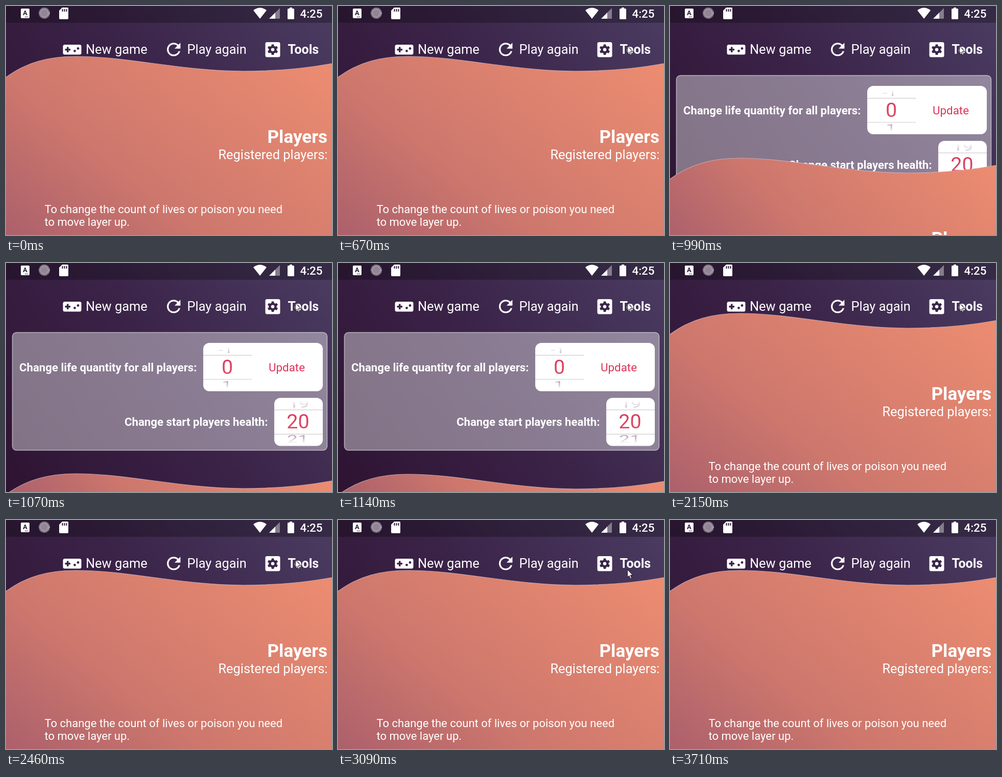
These frames come from a looping animation (638 by 450 pixels, 4020 ms). An HTML page:

```html
<!DOCTYPE html>
<html lang="en">
<head>
<meta charset="utf-8">
<title>Life counter tools</title>
<style>
  html, body { margin: 0; width: 100%; height: 100%; overflow: hidden; background: #33183a; }
  svg { display: block; width: 638px; height: 450px; font-family: Roboto, sans-serif; fill: #fff; }
  .bold { font-weight: 700; }
  .end { text-anchor: end; }
  .mid { text-anchor: middle; }
  .menu { font-size: 25.4px; }
  .label { font-size: 22.2px; }
  .dark { fill: #39254b; }
  .line { stroke: #cfcbd0; stroke-width: 1.2; }
  .value { font-size: 39.5px; fill: url(#red); }
  .faded { font-size: 38px; }
</style>
</head>
<body>
<svg viewBox="0 0 638 450">
  <defs>
    <linearGradient id="night" gradientUnits="userSpaceOnUse" x1="0" y1="450" x2="638" y2="0">
      <stop stop-color="#2e1332"/><stop offset=".5" stop-color="#3b2348"/><stop offset="1" stop-color="#4b3c62"/>
    </linearGradient>
    <linearGradient id="coral" gradientUnits="userSpaceOnUse" x1="638" y1="99" x2="0" y2="899">
      <stop stop-color="#ed8d71"/><stop offset=".42" stop-color="#cd776d"/>
      <stop offset=".7" stop-color="#a65c6b"/><stop offset="1" stop-color="#784169"/>
    </linearGradient>
    <linearGradient id="red" x2="0" y2="1">
      <stop stop-color="#d8345c"/><stop offset="1" stop-color="#e0566a"/>
    </linearGradient>
    <linearGradient id="fadeUp" x2="0" y2="1">
      <stop offset=".2" stop-color="#fff"/><stop offset="1" stop-color="#b9aab2"/>
    </linearGradient>
    <linearGradient id="fadeDown" x2="0" y2="1">
      <stop offset=".2" stop-color="#b9a2ac"/><stop offset=".9" stop-color="#fff"/>
    </linearGradient>
    <clipPath id="wheelA"><rect x="386" y="157" width="95" height="95"/></clipPath>
    <clipPath id="wheelB"><rect x="525" y="265" width="95" height="94"/></clipPath>
  </defs>

  <rect width="638" height="450" fill="url(#night)"/>
  <rect width="638" height="33" fill="#000" opacity=".28"/>

  <g id="status">
    <rect x="29" y="5" width="17" height="19" rx="2"/>
    <text class="mid bold" x="37.5" y="18" font-size="13" fill="#2c1a35">A</text>
    <path d="M37 21.5h6" stroke="#2c1a35" stroke-width="1.3" stroke-dasharray="1.3 1"/>
    <circle cx="75" cy="14" r="8.5" fill="#918596"/>
    <circle cx="75" cy="14" r="9" fill="none" stroke="#bfb7c3" stroke-width="4" stroke-dasharray="1.4 1"/>
    <path d="M110 3h10q2 0 2 2v19q0 2-2 2h-14q-2 0-2-2V9z"/>
    <path d="M110.500 6v5M114.500 6v5M118.500 6v5" stroke="#2c1a35" stroke-width="2"/>
    <path d="M484 8.500Q497-1.500 510 8.500L497 25z"/>
    <path d="M536 4v21h-21z" opacity=".4"/>
    <path d="M527 13v12h-12z"/>
    <path d="M555 3h5v2h2.500q1.500 0 1.500 1.500v18q0 1.500-1.500 1.500h-10q-1.500 0-1.500-1.500v-18q0-1.500 1.500-1.500h2.500z"/>
    <text x="575.500" y="23" font-size="22.300" font-weight="500">4:25</text>
  </g>

  <g id="menu">
    <rect x="111.500" y="76" width="36" height="19.500" rx="3.500"/>
    <path class="dark" d="M119 80.500h3.500v3.500h3.500v3.500h-3.500v3.500h-3.500v-3.500h-3.500v-3.500h3.500z"/>
    <circle class="dark" cx="134.500" cy="88.300" r="2.400"/>
    <circle class="dark" cx="141" cy="83.500" r="2.400"/>
    <text class="menu" x="156" y="94">New game</text>
    <path transform="translate(308.400 65.600) scale(1.65)" d="M17.650 6.350C16.200 4.900 14.210 4 12 4c-4.420 0-7.990 3.580-7.990 8s3.570 8 7.990 8c3.730 0 6.840-2.550 7.730-6h-2.080c-.82 2.330-3.040 4-5.650 4-3.310 0-6-2.690-6-6s2.690-6 6-6c1.660 0 3.140.69 4.220 1.780L13 11h7V4z"/>
    <text class="menu" x="354.500" y="94">Play again</text>
    <rect x="507.500" y="71" width="29" height="29.500" rx="3.500"/>
    <g id="gear" transform="translate(522 85.700)">
      <circle r="5.500" fill="none" stroke="#39254b" stroke-width="4.500"/>
    </g>
    <text class="bold" x="551.500" y="94" font-size="25">Tools</text>
  </g>

  <g id="panel">
    <rect x="12.500" y="136.500" width="616" height="231.500" rx="8" fill-opacity=".4" stroke="#fff" stroke-opacity=".55" stroke-width="1.500"/>
    <text class="label bold end" x="373.500" y="213">Change life quantity for all players:</text>
    <rect x="386" y="157" width="234" height="95" rx="12"/>
    <path class="line" d="M386 181.300h95M386 228.500h95"/>
    <text class="value mid" x="433" y="218">0</text>
    <g clip-path="url(#wheelA)" class="faded mid">
      <text transform="translate(430 177) scale(.9 .48)" fill="url(#fadeUp)">-1</text>
      <text transform="translate(432 245) scale(.9 .48)" fill="url(#fadeDown)">1</text>
    </g>
    <text class="mid" x="549.500" y="213" font-size="22.400" fill="#dc3558">Update</text>
    <text class="label bold end" x="512.500" y="320">Change start players health:</text>
    <rect x="525" y="265" width="95" height="94.500" rx="12"/>
    <path class="line" d="M525 288.700h95M525 336.300h95"/>
    <text class="value mid" x="571.500" y="325">20</text>
    <g clip-path="url(#wheelB)" class="faded mid">
      <text transform="translate(573 284) scale(.95 .52)" fill="url(#fadeUp)">19</text>
      <text transform="translate(571 353) scale(.98 .52)" fill="url(#fadeDown)">21</text>
    </g>
  </g>

  <g id="layer">
    <path d="M-4 143L0 140C40 110 85 99 137 99C237 99 345 128 465 128C530 128 590 122 638 113L642 112V900H-4z" fill="url(#coral)" stroke="#d3b9c3" stroke-opacity=".75" stroke-width="1.200"/>
    <text class="bold end" x="629" y="269" font-size="35">Players</text>
    <text class="menu end" x="629.500" y="301">Registered players:</text>
    <text x="75.500" y="407" font-size="22">To change the count of lives or poison you need</text>
    <text x="75.500" y="432" font-size="22">to move layer up.</text>
  </g>

  <path id="cursor" d="M.5.5V15.500L3.900 12.400L6.300 18.300L8.700 17.300L6.300 11.500H10.800z" stroke="#1d1420" stroke-width="1"/>
</svg>
<script>
  const LOOP = 4020;
  const byId = id => document.getElementById(id);
  const layer = byId('layer'), coral = byId('coral'), cursor = byId('cursor'), gear = byId('gear');

  // [time, layer drop]
  const drops = [[0, 0], [990, 200], [1070, 315], [1140, 316], [1230, 290], [1310, 266], [1390, 257], [2150, 0]];

  // [time, x, y] of the pointer tip; no position means hidden
  const pointer = [
    [0], [70, 547, 403], [140, 549, 350], [220, 553, 280], [300, 557, 210], [370, 561, 155],
    [450, 563, 115], [520, 564, 94], [610, 565, 84], [670, 566, 78],
    [3090, 566, 97], [3160, 563, 150], [3240, 558, 225], [3320, 553, 305], [3400, 549, 370],
    [3480, 546, 415], [3560, 545, 440], [3620, 546, 446], [3710]
  ];

  for (let i = 0; i < 6; i++) {
    const tooth = document.createElementNS('http://www.w3.org/2000/svg', 'rect');
    const shape = { class: 'dark', x: -2.4, y: -10.3, width: 4.8, height: 5, rx: .6, transform: `rotate(${i * 60})` };
    for (const name in shape) tooth.setAttribute(name, shape[name]);
    gear.append(tooth);
  }

  const stepAt = (steps, time) => steps.findLast(step => step[0] <= time);

  function draw() {
    const time = performance.now() % LOOP;
    const drop = stepAt(drops, time)[1];
    layer.setAttribute('transform', `translate(0 ${drop})`);
    coral.setAttribute('y2', 899 - drop); // the gradient shortens with the visible layer

    const [, x, y] = stepAt(pointer, time);
    cursor.style.display = x ? '' : 'none';
    if (x) cursor.setAttribute('transform', `translate(${x} ${y})`);
    requestAnimationFrame(draw);
  }
  draw();
</script>
</body>
</html>
```
